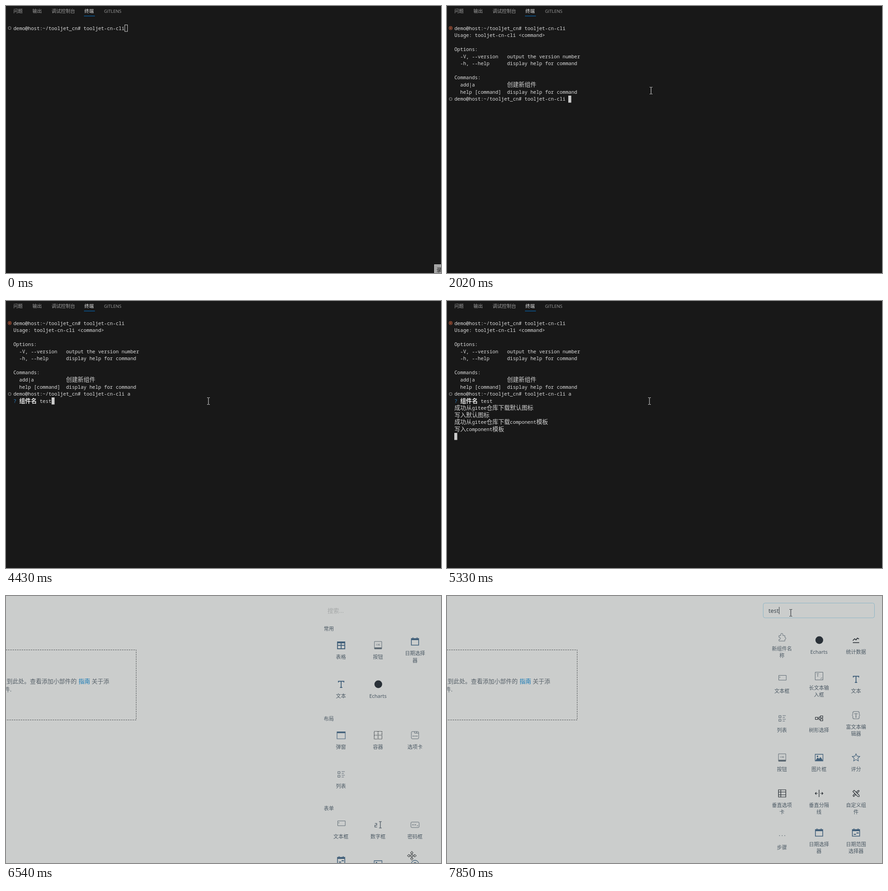
Recreate the animation shown at these times as an HTML page with a canvas. Size 954x587 px, loop 8000 ms.

```html
<!DOCTYPE html>
<html lang="zh-CN">
<head>
<meta charset="utf-8">
<title>CLI demo</title>
<style>
html, body { margin: 0; width: 100%; height: 100%; overflow: hidden; background: #181818; }
canvas { display: block; }
</style>
</head>
<body>
<canvas id="stage" width="954" height="587"></canvas>
<script>
const ctx = document.getElementById('stage').getContext('2d');
const W = 954, H = 587, LOOP = 8000;
const SANS = '"Noto Sans", "Noto Sans CJK SC", "Noto Sans CJK", sans-serif';
const UI = '"Open Sans", "Noto Sans CJK SC", "Noto Sans CJK", sans-serif';
const MONO = '"Noto Sans Mono", monospace';
const CJK = '"Noto Sans CJK SC", "Noto Sans CJK", sans-serif';

// y is the visual middle of the line
function text(s, x, y, size, color, align = 'left', family = SANS) {
  ctx.font = `${size}px ${family}`;
  ctx.fillStyle = color;
  ctx.textAlign = align;
  ctx.fillText(s, x, y + size * 0.38);
}

function rect(x, y, w, h, color) {
  ctx.fillStyle = color;
  ctx.fillRect(x, y, w, h);
}

function shape(d, x, y, stroke, width, fill) {
  const path = new Path2D(d);
  ctx.save();
  ctx.translate(x, y);
  if (fill) { ctx.fillStyle = fill; ctx.fill(path); }
  if (stroke) { ctx.strokeStyle = stroke; ctx.lineWidth = width; ctx.stroke(path); }
  ctx.restore();
}

function circle(x, y, r, stroke, fill, width = 1.4) {
  ctx.beginPath();
  ctx.arc(x, y, r, 0, Math.PI * 2);
  if (fill) { ctx.fillStyle = fill; ctx.fill(); }
  if (stroke) { ctx.strokeStyle = stroke; ctx.lineWidth = width; ctx.stroke(); }
}

// Moves from a to b in n held steps
function glide(t, start, step, n, a, b) {
  const k = Math.floor((t - start) / step) + 1;
  const p = Math.max(0, Math.min(k / n, 1));
  const e = p * p * (3 - 2 * p);
  return [a[0] + (b[0] - a[0]) * e, a[1] + (b[1] - a[1]) * e];
}

// Latest value whose time has come
const at = (t, list) => list.reduce((v, [time, value]) => t >= time ? value : v, list[0][1]);

function ibeam([x, y], color) {
  shape('M-3-7.5H-.5M.5-7.5H3M0-7V7M-3 7.5H-.5M.5 7.5H3', x, y, color, 1.1);
}

/* ---------- terminal ---------- */

const CELL = 6.417, ROW = 15.55, LEFT = 16.2, TOP = 41;
const FG = '#dedede', WIDE_FG = '#d2d2d2', CURSOR = '#cccccc';
const PROMPT = 'demo@host:~/tooljet_cn# ';
const CLI = 'tooljet-cn-cli';
const HELP = [
  `Usage: ${CLI} <command>`,
  '',
  'Options:',
  '  -V, --version   output the version number',
  '  -h, --help      display help for command',
  '',
  'Commands:',
  '  add|a           创建新组件',
  '  help [command]  display help for command'
];
const LOG = ['成功从gitee仓库下载默认图标', '写入默认图标', '成功从gitee仓库下载component模板', '写入component模板'];
const LOG_END = ['成功从gitee仓库下载widget模板', '写入widget模板'];

const rowY = r => Math.round(TOP + r * ROW);

// Draws one row on the cell grid and returns its width in cells
function drawRow(row, r) {
  let col = 0;
  const parts = typeof row === 'string' ? [[row]] : row;
  const base = Math.round(TOP + r * ROW + 11.6);
  ctx.textAlign = 'left';
  for (const [str, color, weight] of parts) {
    for (const run of str.match(/[\u2e80-\uffff]+|[^\u2e80-\uffff]+/g) || []) {
      const wide = run.charCodeAt(0) >= 0x2e80;
      ctx.font = wide ? `${weight || 400} ${CELL * 2}px ${CJK}` : `${weight || 500} ${CELL / 0.6}px ${MONO}`;
      ctx.fillStyle = color || (wide ? WIDE_FG : FG);
      ctx.fillText(run, LEFT + col * CELL, base);
      col += run.length * (wide ? 2 : 1);
    }
  }
  return col;
}

function question(t) {
  const answer = at(t, [[0, ''], [4040, 't'], [4130, 'te'], [4330, 'tes'], [4430, 'test']]);
  return [['? ', '#2b84cc'], ['组件名 ', '#e8e8e8', 'bold'],
    answer ? [answer] : ['(newComponent) ', '#7c7c7c']];
}

function terminalRows(t) {
  const rows = [PROMPT + CLI];
  if (t >= 720) {
    rows.push(...HELP, PROMPT + at(t, [[720, ''], [1720, CLI], [2020, CLI + ' '], [2310, CLI + ' a']]));
  }
  if (t >= 2920) rows.push(t < 3020 ? '' : question(t));
  if (t >= 5330) rows.push(...LOG);
  if (t >= 5530) rows.push(...LOG_END, PROMPT);
  else if (t >= 5030) rows.push('');
  return rows;
}

function marker(r, state) {
  const y = rowY(r) + 7.5;
  if (state === 'ok') circle(8, y, 3.9, null, '#1f7fc0');
  else if (state === 'fail') {
    circle(8, y, 3.4, '#b9583a', null, 1.1);
    circle(8, y, 1.6, null, '#d8663f');
  } else circle(8, y, 3, '#6c6c6c');
}

function terminal(t) {
  rect(0, 0, W, H, '#181818');
  const tabs = [['问题', 16], ['输出', 58], ['调试控制台', 100], ['终端', 172], ['GITLENS', 215]];
  tabs.forEach(([s, x], i) =>
    text(s, x, 11, i === 4 ? 9.7 : 10.3, i === 3 ? '#e7e7e7' : '#9d9d9d', 'left', UI));
  rect(171, 21.5, 24, 1, '#0078d4');

  const rows = terminalRows(t);
  let width = 0;
  rows.forEach((row, r) => { width = drawRow(row, r); });

  marker(0, t >= 720 ? 'fail' : '');
  if (t >= 720) marker(10, t >= 5530 ? 'ok' : '');
  if (t >= 5530) marker(18, '');

  const cx = Math.round(LEFT + width * CELL), cy = rowY(rows.length - 1);
  if (t < 520 || t >= 6440) {
    ctx.strokeStyle = CURSOR;
    ctx.lineWidth = 1;
    ctx.strokeRect(cx + 0.5, cy + 0.5, 6, 14.5);
  } else rect(cx, cy, 6.5, 15.5, CURSOR);

  if (t < 100) {
    rect(939, 568, 15, 19, '#c4c4c4');
    rect(940, 569, 14, 18, '#a2a2a2');
    text('录', 944, 580, 12, '#222', 'left', CJK);
  } else if (t < 6440) {
    const rest = [447.5, 186], low = [444, 220];
    ibeam(t < 3320 ? glide(t, 100, 105, 5, [942, 578], rest)
      : t < 5630 ? glide(t, 3320, 110, 2, rest, low)
      : glide(t, 5630, 103, 4, low, [752, 542]), '#d8d8d8');
  }
}

/* ---------- widget panel ---------- */

const SLATE = '#42607a', INK = '#20262c', GREY = '#5f6b74';

// stroke path, width, colour, fill path, [label, size, dx, dy]
const CALENDAR = 'M-8-6.5H8V8H-8ZM-4.5-9V-6M4.5-9V-6';
const ICONS = {
  表格: ['M-8-7H8V8H-8ZM-8 .5H8M0-6V8', 1.8, SLATE, 'M-8-8H8V-4H-8Z'],
  按钮: ['M-8-8H8V8H-8Z', 1, GREY, 'M-8 5H8V9H-8Z', ['OK', 6, 0, -1.5]],
  日期选择器: [CALENDAR, 1.6, SLATE, 'M-8-7H8V-3H-8Z'],
  日期范围选择器: [CALENDAR, 1.6, SLATE, 'M-8-7H8V-3H-8ZM-5 3H0V5H-5ZM1 0H6V2H1Z'],
  文本: ['M-6-4V-6.5H6V-4M0-6.5V7M-2.5 7H2.5', 1.8, SLATE],
  弹窗: ['M-9-7.5H9V8H-9Z', 1.1, SLATE, 'M-9-8H9V-4.5H-9Z'],
  容器: ['M-8.5-8.5H8.5V8.5H-8.5ZM0-8.5V8.5M-8.5 0H8.5', 1.2, INK],
  选项卡: ['M-6-8H6Q8-8 8-6V6Q8 8 6 8H-6Q-8 8-8 6V-6Q-8-8-6-8ZM-1-8V-4.5H8M3.5-8V-4.5', 1, GREY,
    'M-5 1h2v2h-2zM-1 1h2v2h-2zM3 1h2v2h-2z'],
  列表: ['M-7-6H-2.5V-1.5H-7ZM-7 2H-2.5V6.5H-7ZM1-6H8M1-2H6M1 2H8M1 6H6', 1.2, GREY],
  文本框: ['M-7.5-8.5H9V2H-7.5ZM-5-6V-3', 1, GREY],
  数字框: ['M2-7H8M5-7V7M2 7H8M-7-3H-3V1H-7V5H-2', 1.2, '#3c4a56'],
  密码框: ['M-7-6H7Q9-6 9-4V4Q9 6 7 6H-7Q-9 6-9 4V-4Q-9-6-7-6ZM-6-1.5L-3 1.5M-3-1.5L-6 1.5M-1-1.5L2 1.5M2-1.5L-1 1.5M4 2H7', 1, GREY],
  新组件名称: ['M-7-3H-3V-5.5a2.3 2.3 0 1 1 4.6 0V-3H6V1a2.2 2.2 0 1 1 0 4.4V9H-7V5.5H-6a2.2 2.2 0 1 0 0-4.5H-7Z', 1, GREY],
  统计数据: ['M-7 1L-3-3 0-.5 3-4.5 6.5-2.5M-7 5.5H7', 1.6, INK],
  长文本输入框: ['M-8.5-8.5H8.5V8.5H-8.5ZM6.5 3L3 6.5M6.5 6V6.5H6', 1, GREY, '', ['T', 9, -3, -2.5]],
  树形选择: ['M-8-2.5H-3V2.5H-8ZM3-5.5H8V-1H3ZM3 1H8V5.5H3ZM-3 0H0M3-3H0V3H3', 1.2, INK],
  富文本编辑器: ['M-5-7H-7V-2L-8.5 0-7 2V7H-5M5-7H7V-2L8.5 0 7 2V7H5M-6-8H6M-6 8H6', 1, GREY, '', ['T', 12, 0, 0]],
  图片框: ['M-8.5-7H8.5V7.5H-8.5Z', 1.3, SLATE, 'M-7.5 6L-3 0 0 3 3-1 7.5 5V7H-7.5ZM-5-4h3v3h-3z'],
  评分: ['M0-8L2.5-2.8 8.3-2.2 4 1.8 5.1 7.5 0 4.6-5.1 7.5-4 1.8-8.3-2.2-2.5-2.8Z', 1.2, SLATE],
  垂直选项卡: ['M-8-8H8V8H-8ZM-3-8V8M-8-3H8M-8 3H8', 1.2, INK],
  垂直分隔线: ['M0-8V8M-3 0H-8M-6-2.5L-8.5 0-6 2.5M3 0H8M6-2.5L8.5 0 6 2.5', 1.2, INK],
  自定义组件: ['M-7-4L-4-7 7 4V7H4ZM-7 5L-2 0M0-2L4-6M-7 5L-5 7 0 2M2 0L7-5M4-6Q7-8 7-5', 1.1, INK],
  步骤: ['', 1, GREY, 'M-6.5-1h1.5v1.5h-1.5zM-.7-1h1.5v1.5h-1.5zM5-1h1.5v1.5h-1.5z'],
  单选框: ['M8 0A8 8 0 1 1-8 0A8 8 0 1 1 8 0ZM3 0A3 3 0 1 1-3 0A3 3 0 1 1 3 0Z', 1.3, SLATE]
};

const RESULTS = ['新组件名称', 'Echarts', '统计数据', '文本框', '长文本输入框', '文本', '列表', '树形选择', '富文本编辑器',
  '按钮', '图片框', '评分', '垂直选项卡', '垂直分隔线', '自定义组件', '步骤', '日期选择器', '日期范围选择器'];
const SECTIONS = [
  ['常用', 72, ['表格', '按钮', '日期选择器', '文本', 'Echarts']],
  ['布局', 270, ['弹窗', '容器', '选项卡', '列表']],
  ['表单', 467, ['文本框', '数字框', '密码框', '日期范围选择器', '图片框', '单选框']]
];

function icon(name, x, y) {
  if (name === 'Echarts') return circle(x + 0.5, y, 8.5, null, '#2a3138');
  const [line, width, color, solid, label] = ICONS[name];
  if (name === '容器') ctx.setLineDash([2, 1.4]);
  if (line) shape(line, x, y, color, width);
  ctx.setLineDash([]);
  if (solid) shape(solid, x, y, null, 0, color);
  if (label) text(label[0], x + label[2], y + label[3], label[1], color, 'center', '"Noto Serif", serif');
}

function grid(names, y) {
  names.forEach((name, i) => {
    const x = 734.5 + (i % 3) * 81.2;
    const lines = name.match(/[\x20-\x7e]+|.{1,4}/g);
    const first = y + Math.floor(i / 3) * 86 - (lines.length - 1) * 7.5;
    icon(name, Math.round(x), Math.round(first - 26));
    lines.forEach((s, n) => text(s, x, first + n * 15.5, 11, '#4b5964', 'center'));
  });
}

function page(t) {
  rect(0, 0, W, H, '#cbcdcc');

  ctx.strokeStyle = '#4a4e50';
  ctx.lineWidth = 1;
  ctx.setLineDash([3, 2]);
  ctx.strokeRect(-40.5, 118.5, 326, 154);
  ctx.setLineDash([]);
  text('放到此处。查看添加小部件的', -11.4, 187, 12.8, '#58626a');
  text('指南', 159, 187, 12.8, '#1679b5');
  text('关于添', 188, 187, 12.8, '#58626a');
  text('件.', -4, 205, 12.8, '#58626a');

  const query = at(t, [[0, ''], [7450, 't'], [7550, 'te'], [7650, 'tes'], [7850, 'test']]);
  if (t >= 7240) {
    ctx.strokeStyle = '#8db5c6';
    ctx.beginPath();
    ctx.roundRect(693.5, 15.5, 244, 32.5, 4);
    ctx.stroke();
  }
  if (query) text(query, 705, 32, 12.8, '#3c464e');
  else text('搜索...', 705, 32, 12.8, '#a6a9a9');
  if (t >= 7240) {
    ctx.font = `12.8px ${SANS}`;
    rect(Math.round(705 + ctx.measureText(query).width), 24, 1, 16, '#30383e');
  }

  if (query) {
    // the ranking settles as the query gets longer
    const [top, ...rest] = RESULTS, n = 4 - query.length;
    grid([top, ...rest.slice(n), ...rest.slice(0, n)], 123);
  } else {
    for (const [title, y, names] of SECTIONS) {
      text(title, 697, y, 11, '#4b5964');
      grid(names, y + 61.5);
    }
  }

  const pos = glide(t, 6640, 100, 5, [890, 571], [754, 37]);
  if (pos[1] < 50) ibeam(pos, '#20262c');
  else shape('M0-10L3-6H1V-1H6V-3L10 0 6 3V1H1V6H3L0 10-3 6H-1V1H-6V3L-10 0-6-3V-1H-1V-6H-3Z',
    pos[0], pos[1], '#24282b', 1, '#dcdedd');
}

const start = performance.now();
function frame() {
  const t = (performance.now() - start) % LOOP;
  if (t < 6540) terminal(t);
  else page(t);
  requestAnimationFrame(frame);
}
frame();
</script>
</body>
</html>
```
